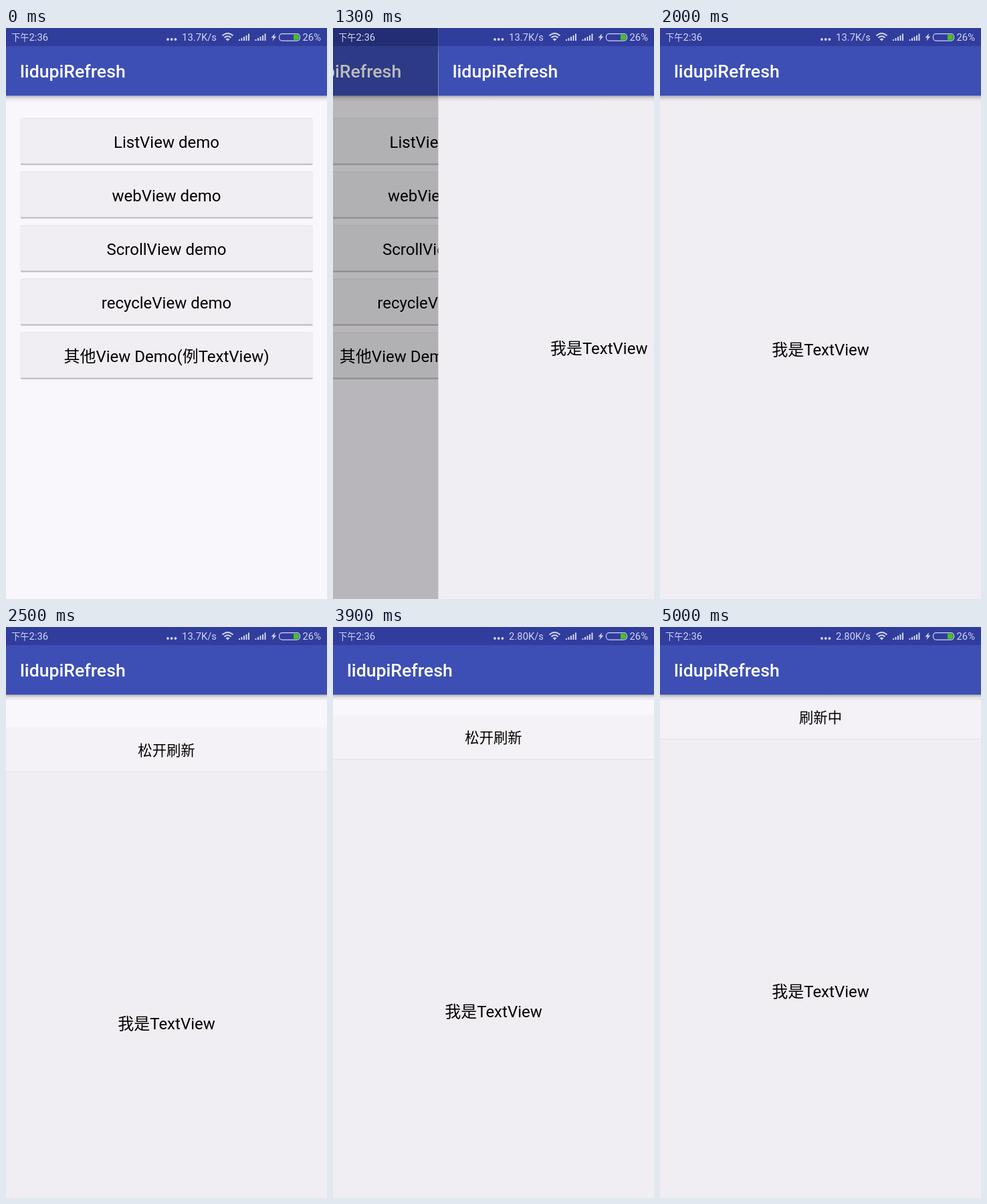
Write an HTML page that moves like this. It is 480 px wide and 853 px high and loops after 5100 ms.

```html
<!DOCTYPE html>
<html lang="zh-CN">
<head>
<meta charset="utf-8">
<title>Pull to refresh</title>
<style>
html, body { margin: 0; height: 100%; overflow: hidden; background: #f9f7fc; }
svg { display: block; width: 100%; height: 100%; font: 24px Roboto, "Noto Sans CJK SC", "Noto Sans CJK", sans-serif; }
.mid { text-anchor: middle; }
.title { font-size: 26.67px; font-weight: 500; fill: #fff; }
.tip { font-size: 21.33px; }
.status { fill: #d3d6ee; font-size: 14.8px; }
.line { fill: none; stroke: #d3d6ee; }
</style>
</head>
<body>
<svg viewBox="0 0 480 853">
  <defs>
    <linearGradient id="shade" x2="0" y2="1">
      <stop stop-opacity=".3"/>
      <stop offset=".4" stop-opacity=".1"/>
      <stop offset="1" stop-opacity="0"/>
    </linearGradient>
    <g id="bar">
      <rect y="101" width="480" height="9" fill="url(#shade)"/>
      <rect width="480" height="101" fill="#3d4fb4"/>
      <rect width="480" height="27" fill="#303d9d"/>
      <text class="title" x="21" y="74">lidupiRefresh</text>
    </g>
    <path id="signal" d="M0 19v-2h2v2zM3.5 19v-4h2v4zM7 19v-6h2v6zM10.5 19v-8h2v8zM14 19v-10.5h2v10.5z"/>
  </defs>

  <g id="menu">
    <rect width="480" height="853" fill="#f9f7fc"/>
    <g id="buttons"></g>
    <use href="#bar"/>
  </g>
  <rect id="dim" width="480" height="853"/>

  <g id="page">
    <rect width="480" height="853" fill="#f9f7fc"/>
    <g id="pull">
      <rect y="35" width="480" height="66" fill="#f4f2f6"/>
      <text id="tip" class="mid tip" x="240" y="77"></text>
      <rect y="101" width="480" height="853" fill="#f0eef2"/>
      <rect y="101" width="480" height="1" fill="#e3e1e5"/>
      <text class="mid" x="240" y="486.6">我是TextView</text>
    </g>
    <use href="#bar"/>
  </g>

  <g class="status">
    <text x="8" y="19" font-size="13.3" style="font-size:13.3px">下午</text>
    <text x="34.5" y="19">2:36</text>
    <circle cx="242" cy="17" r="1.9"/>
    <circle cx="247.7" cy="17" r="1.9"/>
    <circle cx="253.4" cy="17" r="1.9"/>
    <text id="speed" x="315" y="19" text-anchor="end"></text>
    <path class="line" stroke-width="2" d="M323.5 11.5q8-7 16 0M326.5 14.5q5-4.4 10 0"/>
    <path d="M328.5 16.6q3-2.4 6 0l-3 3z"/>
    <use href="#signal" x="348"/>
    <use href="#signal" x="372.5"/>
    <path d="M402.5 8l-6 6.6h3.4l-1.6 5 6-7h-3.4z"/>
    <rect class="line" x="408.5" y="8.7" width="31" height="10.4" rx="4.5" stroke-width="1.2"/>
    <path d="M430 10h5q3.2 0 3.2 3.9t-3.2 3.9h-5z" fill="#45c31c"/>
    <text x="443.5" y="19">26%</text>
  </g>
</svg>
<script>
const $ = id => document.getElementById(id);
const LOOP = 5100, STEP = 100, HEADER = 66;

const labels = ["ListView demo", "webView demo", "ScrollView demo", "recycleView demo", "其他View Demo(例TextView)"];
$("buttons").innerHTML = labels.map((label, i) => `
  <g transform="translate(0 ${i * 80})">
    <rect x="21.5" y="134.5" width="437" height="70.5" rx="2" fill="#e3e1e5"/>
    <rect x="22" y="202" width="436.5" height="2.4" rx="1" fill="#bfbdc1"/>
    <rect x="22" y="135.5" width="436" height="67" rx="1.5" fill="#f0eef2"/>
    <text class="mid" x="240" y="178.8">${label}</text>
  </g>`).join("");

const progress = (t, from, to) => Math.min(1, Math.max(0, (t - from) / (to - from)));
const smooth = (t, from, to) => {
  const p = progress(t, from, to);
  return p * p * (3 - 2 * p);
};

// Two drags: the first is pushed back, the second is released and settles at the header.
const pullAt = t =>
  117 * (smooth(t, 1950, 2550) - smooth(t, 2620, 3140)) +
  105 * smooth(t, 3650, 3955) - (105 - HEADER) * smooth(t, 4080, 4700);

const move = (id, x, y) => $(id).setAttribute("transform", `translate(${x} ${y})`);

function draw(t) {
  const slide = 1 - (1 - progress(t, 1207, 1507)) ** 3;
  const y = pullAt(t);
  move("menu", -114 * slide, 0);
  $("dim").setAttribute("opacity", 0.39 * slide);
  move("page", 480 * (1 - slide), 0);
  move("pull", 0, y);
  $("tip").textContent = t >= 4200 ? "刷新中" : y >= HEADER ? "松开刷新" : "下拉刷新";
  $("speed").textContent = t < 3500 ? "13.7K/s" : "2.80K/s";
}

const start = performance.now();
function tick() {
  const t = (performance.now() - start) % LOOP;
  draw(Math.floor(t / STEP) * STEP);
  requestAnimationFrame(tick);
}
tick();
</script>
</body>
</html>
```
